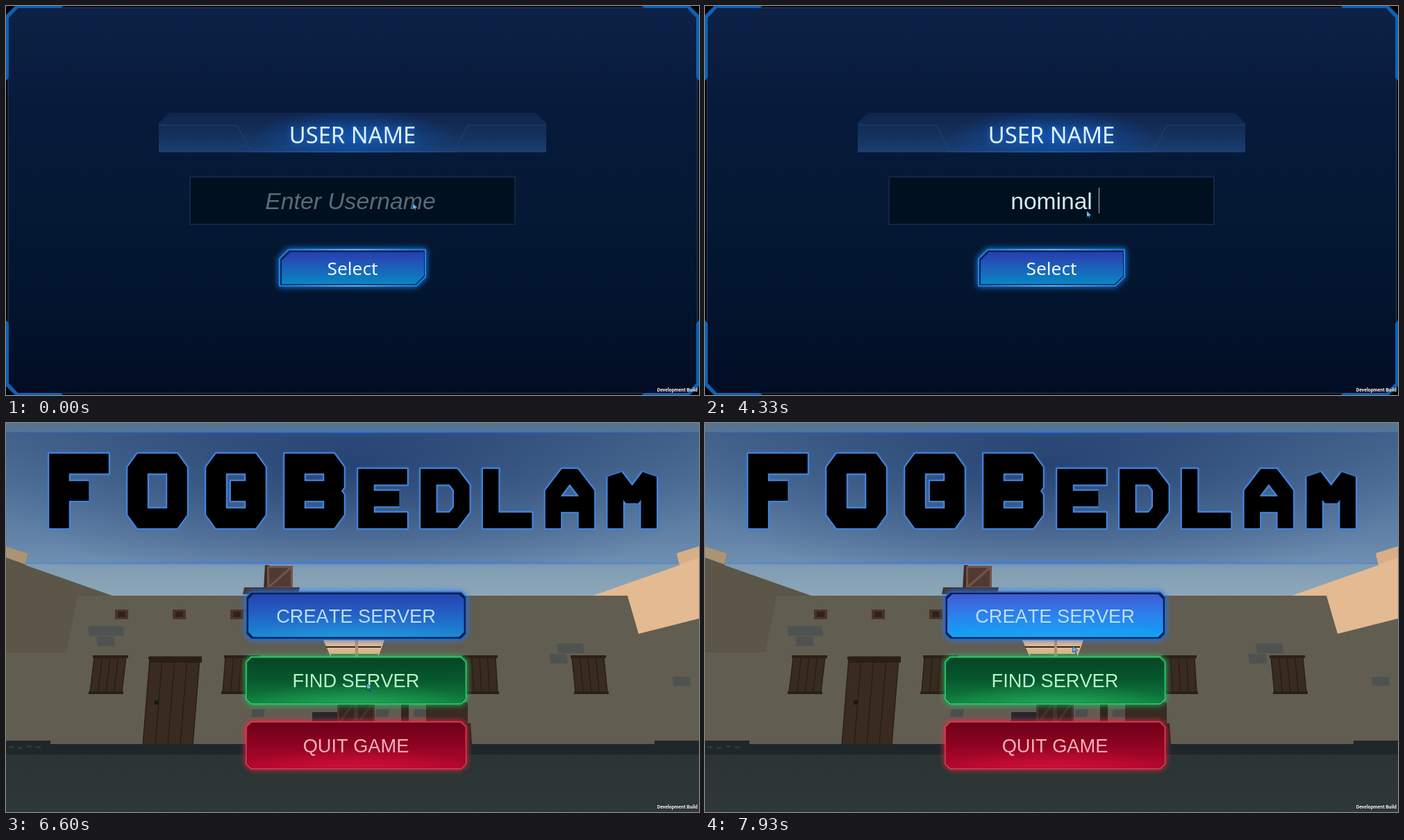
These frames come from a looping animation (998x561 px, 8000 ms). An HTML page with a canvas:

```html
<!DOCTYPE html>
<html lang="en">
<head>
<meta charset="utf-8">
<title>Game menu</title>
<style>
html, body { margin: 0; width: 100%; height: 100%; overflow: hidden; background: #000; }
canvas { display: block; width: 998px; height: 561px; }
</style>
</head>
<body>
<canvas id="stage" width="998" height="561" aria-label="Login screen, then the FOGBedlam main menu"></canvas>
<script>
const W = 998, H = 561, MID = W / 2, LOOP = 8000, FPS = 15, MENU_AT = 99;
const ctx = document.getElementById('stage').getContext('2d');
const SANS = '"Liberation Sans", Arial, sans-serif';
const UI = '"Noto Sans", "Open Sans", sans-serif';

const NAME = 'nominal nickname';
// typing bursts: first step, last step, letters
const BURSTS = [[53, 56, 2], [58, 65, 6], [70, 76, 6], [78, 81, 2]];
// pointer glides: first step, last step, x, y
const GLIDES = [
  [0, 2, 590, 290], [14, 20, 633, 352], [29, 32, 550, 296], [88, 95, 520, 376],
  [112, 115, 527, 322], [115, 117, 531, 290], [117, 119, 530, 322]
];

// one stroke per letter on an 8 by 8 grid, each point as two digits
const GLYPHS = {
  F: '08 04 64 04 00 80',
  O: '40 70 81 87 78 18 07 01 10 40',
  G: '82 81 70 10 01 07 18 78 87 84 54',
  B: '04 00 70 81 83 74 85 87 78 08 04 74',
  E: '80 00 04 84 04 08 88',
  D: '04 00 60 82 86 68 08 04',
  L: '00 08 88',
  A: '08 05 85 05 03 30 50 83 88',
  M: '08 00 44 80 88'
};

const clamp = v => Math.max(0, Math.min(1, v));
const progress = (n, from, to) => clamp((n - from) / (to - from));

function grad(y0, y1, ...colors) {
  const g = ctx.createLinearGradient(0, y0, 0, y1);
  colors.forEach((c, i) => g.addColorStop(i / (colors.length - 1), c));
  return g;
}

function trace(pts) {
  ctx.beginPath();
  for (let i = 0; i < pts.length; i += 2) ctx.lineTo(pts[i], pts[i + 1]);
}

function poly(color, ...pts) {
  trace(pts);
  ctx.fillStyle = color;
  ctx.fill();
}

function line(color, width, ...pts) {
  trace(pts);
  ctx.strokeStyle = color;
  ctx.lineWidth = width;
  ctx.stroke();
}

function rect(color, x, y, w, h) {
  ctx.fillStyle = color;
  ctx.fillRect(x, y, w, h);
}

// box whose lower edge is shifted sideways
function slant(color, x, y, w, h, lean) {
  poly(color, x, y, x + w, y, x + w + lean, y + h, x + lean, y + h);
}

function text(str, x, y, font, color, align = 'center') {
  ctx.font = font;
  ctx.textAlign = align;
  ctx.fillStyle = color;
  ctx.fillText(str, x, y);
}

function glow(color, blur, draw) {
  ctx.save();
  ctx.shadowColor = color;
  ctx.shadowBlur = blur;
  draw();
  ctx.restore();
}

// horizontal light line, bright in the middle
function beam(y, width, height, rgb, alpha) {
  const x = MID - width / 2, g = ctx.createLinearGradient(x, 0, x + width, 0);
  [0, alpha, 0].forEach((a, i) => g.addColorStop(i / 2, `rgba(${rgb},${a})`));
  rect(g, x, y - height / 2, width, height);
}

function ellipseGlow(x, y, rx, ry, rgb, alpha) {
  ctx.save();
  ctx.translate(x, y);
  ctx.scale(rx, ry);
  const g = ctx.createRadialGradient(0, 0, 0, 0, 0, 1);
  [alpha, alpha / 2, 0].forEach((a, i) => g.addColorStop(i / 2, `rgba(${rgb},${a})`));
  rect(g, -1, -1, 2, 2);
  ctx.restore();
}

// rectangle with cut corners: a = top left and bottom right, b = the others
function cut(x0, y0, x1, y1, a, b) {
  trace([x0, y0 + a, x0 + a, y0, x1 - b, y0, x1, y0 + b,
    x1, y1 - a, x1 - a, y1, x0 + b, y1, x0, y1 - b]);
  ctx.closePath();
}

function mirrored(fx, fy, draw) {
  ctx.save();
  ctx.translate(fx * W, fy * H);
  ctx.scale(1 - 2 * fx, 1 - 2 * fy);
  draw();
  ctx.restore();
}

function drawPointer(n) {
  let x = 586, y = 285;
  for (const [from, to, tx, ty] of GLIDES) {
    const k = progress(n, from, to);
    x += (tx - x) * k;
    y += (ty - y) * k;
  }
  const arrow = [x, y, x, y + 8, x + 2, y + 6.5, x + 4, y + 9.5, x + 3.6, y + 6, x + 6, y + 5.8, x, y];
  line('#0b1c38', 1.2, ...arrow);
  poly('#62b8ee', ...arrow);
}

function buildTag() {
  glow('#000', 2, () => text('Development Build', 996, 556, 'bold 6.9px Roboto, sans-serif', '#fff', 'right'));
}

// ---------- login ----------

function backdrop() {
  rect('#000', 0, 0, W, H);
  cut(3, 2.5, 995.5, 558.5, 14, 14);
  ctx.fillStyle = grad(0, H, '#0d2247', '#071a3b', '#051935', '#03152e', '#020d24');
  ctx.fill();
  ctx.strokeStyle = '#29476f';
  ctx.lineWidth = 1;
  ctx.stroke();
  for (const fx of [0, 1]) for (const fy of [0, 1]) mirrored(fx, fy, () => {
    poly('#000', 0, 0, 18, 0, 0, 18);
    poly('#0b62b6', 0, 108, 0, 13, 13, 0, 83, 0, 78, 3, 17, 3, 4, 17, 4, 103);
  });
}

function heading() {
  ctx.save();
  cut(220, 154, 778, 230, 15, 15);
  ctx.clip();
  ctx.beginPath();
  ctx.rect(220, 154, 558, 57);
  ctx.clip();
  rect(grad(154, 211, '#10254b', '#142f5a', '#1a3f71'), 220, 154, 558, 57);
  ellipseGlow(MID, 190, 150, 42, '14,88,190', .75);
  ctx.restore();
  for (const fx of [0, 1]) mirrored(fx, 0, () => line('#1b4682', 1, 220, 172, 333, 172, 353, 210, MID, 210));
  beam(210.5, 338, 1.2, '40,116,210', .8);
  glow('#1c6fd8', 8, () => text('USER NAME', MID, 197.5, '32.7px ' + UI, '#e0f1ff'));
}

function field(n) {
  rect('#01101f', 265, 246.5, 468, 68.5);
  const press = Math.min(progress(n, 34, 36), progress(n, 39, 37));
  rect(`rgba(0,0,0,${press * .22})`, 265, 246.5, 468, 68.5);
  ctx.strokeStyle = '#142b53';
  ctx.lineWidth = 1.5;
  ctx.strokeRect(265, 246.5, 468, 68.5);

  const count = BURSTS.reduce((sum, [a, b, c]) => sum + Math.round(c * progress(n, a, b)), 0);
  const typed = NAME.slice(0, count);
  let caret = MID;
  if (typed) {
    ctx.font = '33.6px ' + SANS;
    const left = MID - ctx.measureText(typed.trimEnd()).width / 2;
    caret = left + ctx.measureText(typed).width;
    text(typed, left, 293, ctx.font, '#d2ecf4', 'left');
  } else {
    text('Enter Username', 496, 293, 'italic 33.7px ' + SANS, '#5b6b77');
  }
  const blink = (n >= 36 && n < 44) || (n >= 52 && n < 89);
  if (blink) rect('#a9bcc8', Math.round(caret), 262, 1, 37);
}

function selectButton(hot) {
  glow('#1787ff', 9, () => {
    cut(394, 351.5, 604, 403.5, 13, 0);
    ctx.fillStyle = hot ? '#0a2a5c' : '#041230';
    ctx.fill();
    ctx.strokeStyle = '#2380dc';
    ctx.lineWidth = 2;
    ctx.stroke();
  });
  for (const y of [351.4, 403.6]) beam(y, 190, 1.4, '130,215,255', .9);
  cut(397, 355, 602, 401, 12, 0);
  ctx.fillStyle = grad(355, 401, '#2b3cb0', '#1a62ba', '#0787c4');
  ctx.fill();
  ctx.globalAlpha = hot;
  ctx.fillStyle = grad(355, 401, '#3f55d2', '#2480e6', '#10a6f2');
  ctx.fill();
  ctx.globalAlpha = 1;
  text('Select', MID, 387.5, '26.3px ' + UI, '#f2f9ff');
}

function login(n) {
  backdrop();
  heading();
  field(n);
  selectButton(progress(n, 93, 95));
}

// ---------- menu ----------

function sky() {
  rect(grad(0, 250, '#557390', '#5f7f9b', '#7391ab', '#8ea8ba'), 0, 0, W, 260);
  ctx.save();
  ctx.beginPath();
  ctx.rect(0, 13, W, 190);
  ctx.clip();
  rect(grad(13, 203, 'rgba(30,66,128,.35)', 'rgba(56,100,170,.22)'), 0, 13, W, 190);
  ellipseGlow(MID, 60, 540, 190, '22,46,98', .66);
  ctx.restore();
  for (const y of [13, 202.5]) {
    rect('rgba(52,118,214,.4)', 0, y - .7, W, 1.4);
    glow('#1e70ff', 6, () => beam(y, W, 1.6, '44,124,240', .9));
  }
}

function gable(side, wall, tip, inner, outer) {
  mirrored(side, 0, () => {
    poly(wall, 0, 178, 32, 188, 28, 205, 153, 249, 103, 249, 87, inner, 0, outer);
    poly(tip, 0, 178, 32, 188, 28, 204, 0, 194);
  });
}

function planks(x, y, w, h, lean, count) {
  slant('#392b20', x, y, w, h, lean);
  for (let i = 0; i <= count; i++) {
    const px = x + w * i / count;
    line('#261c15', 1.3, px, y, px + lean, y + h);
  }
  rect('#2b2019', x - 2, y - 3, w + 5, 4);
}

function shutters(x, lean) {
  planks(x, 338, 46, 50, lean, 4);
  rect('#2b2019', x + lean - 2, 387, 50, 4);
}

function stones(x, y, dir) {
  slant('#4e5352', x, y, 50 - 12 * (dir < 0), 14, 2);
  slant('#4e5352', x + 12 * dir, y + 15, 25, 14, 2);
}

function crate(x, y, w, h) {
  rect('#513a33', x, y, w, h);
  line('#72544a', 3, x + 2, y + h - 2, x + w - 2, y + 2);
  ctx.strokeRect(x + 1.5, y + 1.5, w - 3, h - 3);
}

function courtyard() {
  poly('#dfb78f', 457, 313, 545, 313, 536, 338, 468, 338);
  rect('#66694f', 468, 333, 68, 5);
  rect('#2b2a29', 461, 322, 79, 2);
  rect('#b08d74', 503, 313, 4, 24);
  rect('#23272c', 441, 417, 40, 15);
  for (const x of [477, 504]) {
    crate(x, 400, 27, 36);
    rect('rgba(25,18,15,.5)', x, 400, 27, 36);
  }
  for (const x of [355, 534, 588]) slant('#4a4f4e', x, 413, 18, 11, -2);
  rect('#30261f', 569, 403, 11, 30);
  rect('#382b22', 605, 403, 60, 30);
  slant('#2c241f', 658, 433, 11, 58, 4);
}

function ground() {
  rect('#20272b', 0, 463, W, 20);
  for (const fx of [0, 1]) mirrored(fx, 0, () => rect('#20272b', 0, 458, 64, 20));
  rect(grad(478, H, '#2a3432', '#2e3836'), 0, 478, W, H - 478);
  for (let x = 4; x < 56; x += 13) rect('#2f3739', x, 465 + x % 3, 7, 3);
}

function village() {
  rect('#625d51', 0, 249, W, 216);
  gable(0, '#5b5647', '#ab9475', 331, 331);
  gable(1, '#e4ba92', '#d8ae87', 304, 282);

  for (let i = 0; i < 3; i++) {
    rect('#493428', 157 + i * 83, 269, 19, 14);
    rect('#2f221b', 161 + i * 83, 272, 11, 8);
  }
  stones(118, 293, 1);
  stones(793, 318, -.9);
  slant('#4e5352', 960, 366, 25, 13, 1);

  planks(207, 340, 72, 124, -10, 4);
  rect('#2a1f17', 207, 336.5, 75, 9);
  rect('#15171a', 214, 400, 6, 6);
  shutters(127, -6);
  shutters(316, -4);
  shutters(659, 3);
  shutters(815, 5);

  slant('#3c2a27', 373, 205, 6, 34, -2);
  crate(376, 206, 37, 33);
  slant('#453530', 343, 237, 80, 10, -2);
  courtyard();
  ground();
}

function lettering(color, extra) {
  [...'FOGBEDLAM'].forEach((ch, i) => {
    const big = i < 4, w = big ? 86 : 71, t = big ? 29 : 23;
    const x = big ? 62 + i * 113 : 507 + (i - 4) * 89.8;
    const y = big ? 44 : 66, h = 152 - y;
    const pts = GLYPHS[ch].split(' ').flatMap(p => [
      x + t / 2 + p[0] / 8 * (w - t),
      y + t / 2 + p[1] / 8 * (h - t)
    ]);
    line(color, t + extra, ...pts);
  });
}

function title() {
  ctx.save();
  ctx.lineCap = 'square';
  ctx.miterLimit = 1.6;
  glow('#2a7cf0', 3, () => lettering('#4a8ad8', 3));
  lettering('#000', -.5);
  ctx.restore();
}

function menuButton(label, y, s, hot) {
  glow(s.glow, 8, () => {
    cut(346, y, 662.5, y + 67.5, 7, 7);
    ctx.fillStyle = s.edge;
    ctx.fill();
    ctx.strokeStyle = s.rim;
    ctx.lineWidth = 1.4;
    ctx.stroke();
  });
  const m = s.inset;
  cut(346 + m, y + m, 662.5 - m, y + 67.5 - m, 7, 7);
  ctx.save();
  ctx.clip();
  rect(grad(y, y + 67, ...s.fill), 346, y, 317, 68);
  ctx.globalAlpha = hot;
  rect(grad(y, y + 67, ...s.hot), 346, y, 317, 68);
  ctx.globalAlpha = 1;
  ellipseGlow(504, y + 70, 170, 34, s.light, .55);
  ctx.restore();
  ctx.fontKerning = 'none';
  text(label, 504, y + 43.5, '27.2px ' + SANS, s.text);
  ctx.fontKerning = 'auto';
}

const BLUE = {
  glow: '#1c78ff', edge: '#06122d', rim: '#1c62c8', inset: 3, light: '40,165,240', text: '#bfdcf8',
  fill: ['#2740ae', '#2264c6', '#1b8bd2'], hot: ['#4456d0', '#2a82ee', '#0fa4f4']
};
const GREEN = {
  glow: '#18d068', edge: '#0a5c30', rim: '#2bd474', inset: 1.5, light: '50,200,115', text: '#b8f5cc',
  fill: ['#044425', '#07592f', '#10833f'], hot: ['#0b6438', '#118a4a', '#1cb562']
};
const RED = {
  glow: '#f02440', edge: '#7a0820', rim: '#e83a54', inset: 1.5, light: '235,24,64', text: '#f3b0b8',
  fill: ['#6c0018', '#8e0422', '#b8062f'], hot: ['#8c0020', '#b8062f', '#e01040']
};

function menu(n) {
  sky();
  village();
  title();
  menuButton('CREATE SERVER', 244, BLUE, progress(n, 115, 117));
  menuButton('FIND SERVER', 337.5, GREEN, Math.min(progress(n, 99, 101), progress(n, 115, 113)));
  menuButton('QUIT GAME', 431, RED, 0);
}

let last = -1;
function tick(now) {
  const n = Math.min(119, Math.floor((now % LOOP + 5) * FPS / 1000));
  if (n !== last) {
    last = n;
    (n < MENU_AT ? login : menu)(n);
    drawPointer(n);
    buildTag();
  }
  requestAnimationFrame(tick);
}
tick(0);
</script>
</body>
</html>
```
